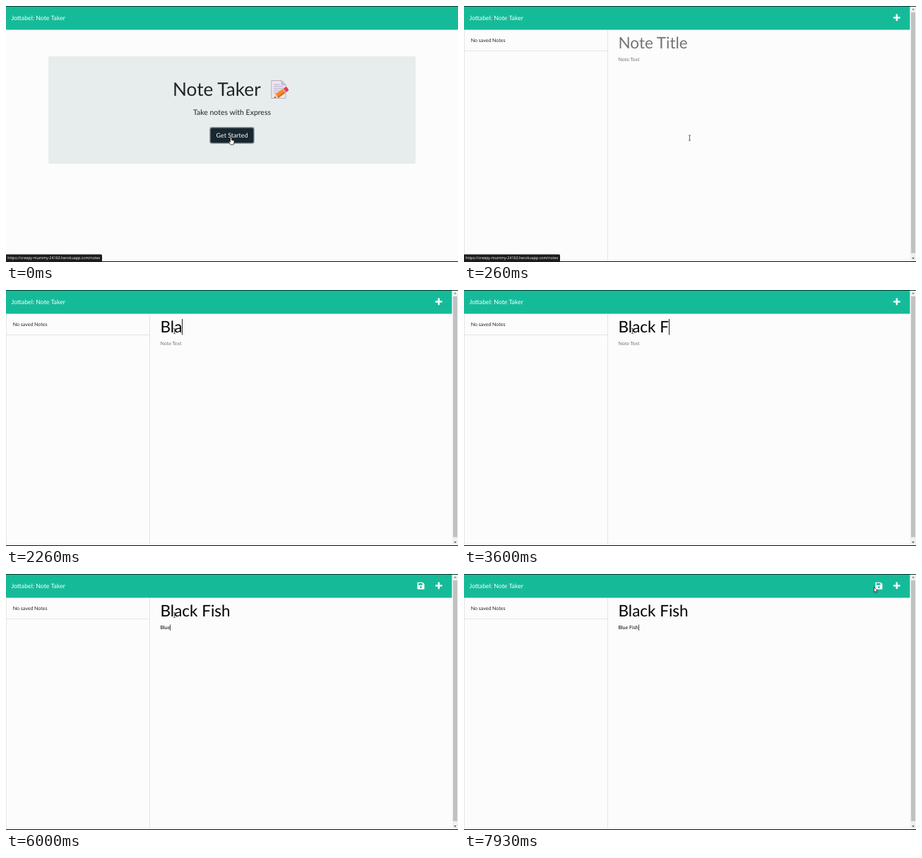
An HTML page with a canvas that plays this animation: 640x362 px, repeating every 8 s.

```html
<!DOCTYPE html>
<html lang="en">
<head>
<meta charset="utf-8">
<title>Note Taker</title>
<style>
  html, body { margin: 0; width: 100%; height: 100%; overflow: hidden; background: #fcfcfc; }
  canvas { display: block; width: 640px; height: 362px; }
</style>
</head>
<body>
<canvas id="stage"></canvas>
<script>
const W = 640, H = 362, LOOP = 8000, BLINK = 530;
const PAGE_FLIP = 250, STATUS_END = 600;
const TEAL = '#15bb99', PAGE = '#fcfcfc', LINE = '#e4e5e5', HINT = '#757575';
const LATO = 'Lato, sans-serif';
const FIELD_X = 218.5;

const canvas = document.getElementById('stage');
const ctx = canvas.getContext('2d');
const dpr = window.devicePixelRatio || 1;
canvas.width = W * dpr;
canvas.height = H * dpr;
// Keeps fractional glyph advances, as in a scaled-down page.
ctx.textRendering = 'geometricPrecision';

// Key times in ms; a field shows its caret from focus to blur.
const title = {
  text: 'Black Fish', hint: 'Note Title', size: 22.5, base: 59.9, top: 41, height: 22.5,
  focus: 1070, blur: 4795,
  keys: [1850, 2040, 2250, 2730, 2940, 3330, 3595, 3860, 4070, 4330]
};
const body = {
  text: 'Blue Fish', hint: 'Note Text', size: 7.03, base: 78.4, top: 71.5, height: 8.5,
  focus: 4795, blur: LOOP,
  keys: [5480, 5620, 5780, 5940, 6080, 6220, 6390, 6620, 6855]
};

// Pointer stops: time, x, y.
const path = [
  [0, 319.5, 186.5], [330, 319.5, 186.5], [860, 246, 60], [1100, 238.5, 58],
  [7390, 238.5, 58], [7930, 580.5, 18.5]
];

function rect(x, y, w, h, color) {
  ctx.fillStyle = color;
  ctx.fillRect(x, y, w, h);
}

function round(x, y, w, h, r, color) {
  ctx.fillStyle = color;
  ctx.beginPath();
  ctx.roundRect(x, y, w, h, r);
  ctx.fill();
}

function poly(points, fill, stroke, width = 1) {
  ctx.beginPath();
  points.forEach(([x, y]) => ctx.lineTo(x, y));
  ctx.closePath();
  if (fill) { ctx.fillStyle = fill; ctx.fill(); }
  if (stroke) {
    ctx.strokeStyle = stroke;
    ctx.lineWidth = width;
    ctx.lineJoin = 'round';
    ctx.stroke();
  }
}

function text(str, x, y, size, color, align = 'left', family = LATO) {
  ctx.font = `${size}px ${family}`;
  ctx.textAlign = align;
  ctx.fillStyle = color;
  ctx.fillText(str, x, y);
}

function at(x, y, draw) {
  ctx.save();
  ctx.translate(x, y);
  draw();
  ctx.restore();
}

function pointerAt(t) {
  const i = path.findIndex(p => p[0] > t);
  if (i < 0) return path[path.length - 1].slice(1);
  const [t0, x0, y0] = path[i - 1], [t1, x1, y1] = path[i];
  const u = (t - t0) / (t1 - t0), k = u * u * (3 - 2 * u);
  return [x0 + (x1 - x0) * k, y0 + (y1 - y0) * k];
}

function header(width) {
  rect(0, 1, width, 32.6, TEAL);
  text('Jottabel: Note Taker', 7.4, 20, 8.78, '#fff');
}

function edges() {
  rect(0, 0, W, 1, '#06382d');
  rect(0, 361, W, 1, '#111');
}

function statusBar() {
  round(-2, 351.2, 138, 12, 1.5, '#1b1c1e');
  text('https://creepy-mummy-24163.herokuapp.com/notes', 2.3, 358.2, 5.35, '#fff',
    'left', '"Open Sans", sans-serif');
}

function memo() {
  const sheet = [[375.8, 105.5], [390, 105.5], [396, 111.5], [396, 130.5], [375.8, 130.5]];
  poly(sheet, '#ece6f1', '#b3aabb', 0.9);
  poly([[390, 105.5], [390, 111.5], [396, 111.5]], '#cfc4d9', '#b3aabb', 0.8);
  for (let i = 0; i < 5; i++) rect(379, 110.5 + i * 3, i ? 13.5 : 8.5, 1, '#b3a8bf');
  at(379.8, 130, () => {
    ctx.rotate(-0.62);
    poly([[0, 0], [5, -3.4], [5, 3.4]], '#f5cf9e');
    poly([[0, 0], [2, -1.2], [2, 1.2]], '#4b4048');
    rect(4.8, -3.4, 12, 6.8, '#f48a24');
    rect(4.8, 1.2, 12, 2.2, '#dd6c1c');
    rect(16.5, -3.4, 2.2, 6.8, '#b9b3c4');
    round(18.5, -3.4, 5, 6.8, [0, 2, 2, 0], '#ec3b59');
  });
}

function hand(x, y) {
  at(x, y, () => {
    ctx.beginPath();
    ctx.moveTo(-1.3, 4.8);
    ctx.lineTo(-1.3, -0.2);
    ctx.quadraticCurveTo(-0.3, -1.4, 0.6, -0.2);
    ctx.lineTo(0.6, 3);
    ctx.lineTo(3.6, 3.7);
    ctx.quadraticCurveTo(4.6, 4, 4.4, 5.4);
    ctx.lineTo(3.5, 9.6);
    ctx.lineTo(-0.9, 9.6);
    ctx.lineTo(-3.3, 5.8);
    ctx.quadraticCurveTo(-2.8, 4.4, -1.3, 6);
    ctx.closePath();
    ctx.fillStyle = '#fff';
    ctx.fill();
    ctx.strokeStyle = '#111';
    ctx.lineWidth = 0.7;
    ctx.stroke();
  });
}

function beam(x, y) {
  rect(x - 0.4, y - 3.6, 0.9, 7.2, '#555');
  rect(x - 1.7, y - 4, 3.4, 0.8, '#666');
  rect(x - 1.7, y + 3.2, 3.4, 0.8, '#666');
}

function arrow(x, y) {
  const shape = [[0, 0], [0, 7.4], [1.7, 5.9], [2.9, 8.6], [4.1, 8], [2.9, 5.5], [5, 5.3]];
  at(x, y, () => poly(shape, '#fff', '#111', 0.7));
}

function home() {
  header(W);
  round(60, 71, 520, 152, 2, '#e7eded');
  text('Note Taker', 236, 126.9, 26.2, '#212529');
  memo();
  text('Take notes with Express', 320, 154.2, 10.5, '#212529', 'center');
  round(288.2, 171, 63.6, 23.8, 3, '#8b979c');
  round(289.6, 172.4, 60.8, 21, 2, '#18262f');
  text('Get Started', 320, 185.8, 8.9, '#fff', 'center');
}

function scrollBar() {
  rect(631.6, 1, 8.4, 360, '#f1f1f1');
  rect(633, 9, 6, 340.5, '#c1c1c1');
  poly([[634, 5.6], [638, 5.6], [636, 3.4]], '#777');
  poly([[634, 355.8], [638, 355.8], [636, 358]], '#555');
}

function plusIcon() {
  round(607.9, 15.2, 9.8, 2.5, 0.8, '#f7fcfb');
  round(611.55, 11.55, 2.5, 9.8, 0.8, '#f7fcfb');
}

function saveIcon() {
  poly([[582.9, 12.2], [590, 12.2], [592, 14.2], [592, 21.2], [582.9, 21.2]], '#fff', '#fff', 0.8);
  rect(584, 13, 5.6, 2.7, TEAL);
  ctx.fillStyle = TEAL;
  ctx.beginPath();
  ctx.arc(587.4, 18.7, 1.4, 0, Math.PI * 2);
  ctx.fill();
}

function field(f, t) {
  const count = f.keys.filter(k => k <= t).length;
  const typed = f.text.slice(0, count);
  text(typed || f.hint, FIELD_X, f.base, f.size, typed ? '#000' : HINT);
  if (t < f.focus || t >= f.blur) return;
  const last = count ? f.keys[count - 1] : f.focus;
  if (Math.floor((t - last) / BLINK) % 2) return;
  const x = FIELD_X + ctx.measureText(typed).width;
  rect(Math.floor(x + 0.5), f.top, f === title ? 1 : 0.8, f.height, '#222');
}

function notes(t) {
  header(631.6);
  rect(0, 34, 1, 327, LINE);
  rect(203, 34, 1, 327, LINE);
  rect(0, 63, 203, 1, LINE);
  text('No saved Notes', 9.7, 51.2, 7.03, '#212529');
  field(title, t);
  field(body, t);
  plusIcon();
  if (t >= body.keys[0]) saveIcon();
  scrollBar();
}

function draw(t) {
  ctx.setTransform(dpr, 0, 0, dpr, 0, 0);
  rect(0, 0, W, H, PAGE);
  const onHome = t < PAGE_FLIP;
  if (onHome) home(); else notes(t);
  edges();
  if (t < STATUS_END) statusBar();
  const [x, y] = pointerAt(t);
  if (onHome) hand(x - 0.7, y);
  else if (y < 34) arrow(x, y);
  else beam(x, y);
}

let start;
function tick(now) {
  start ??= now;
  draw((now - start) % LOOP);
  requestAnimationFrame(tick);
}
requestAnimationFrame(tick);
</script>
</body>
</html>
```
